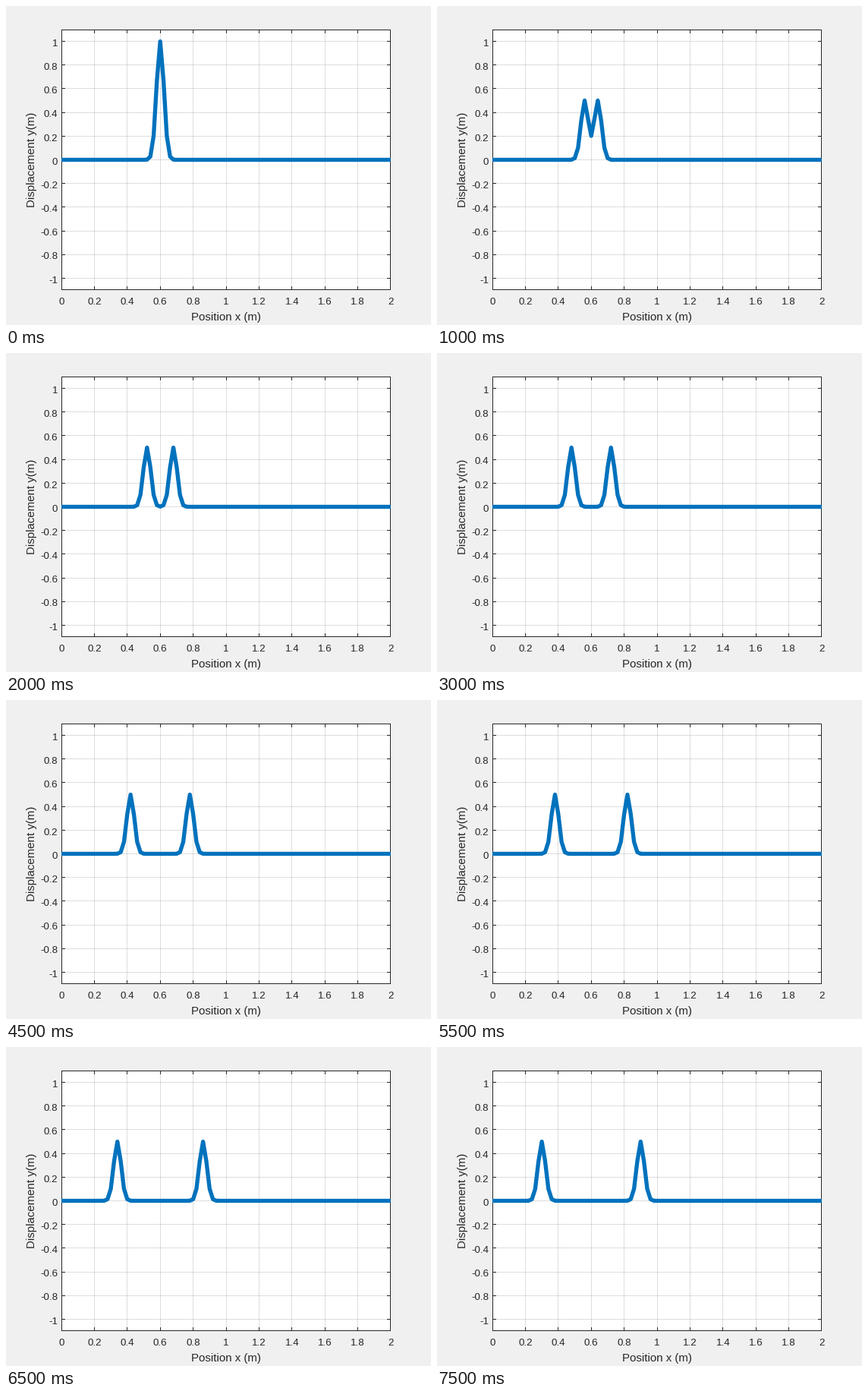
A matplotlib script for the animation above (8 s loop, 560 by 420 pixels).

```python
import math

import numpy as np
import matplotlib.pyplot as plt
from matplotlib.animation import FuncAnimation
from matplotlib.patches import Rectangle

W, H, DPI = 560, 420, 100
PX = 72 / DPI  # points per pixel
LEFT, TOP, RIGHT, BOTTOM = 73, 31, 507, 374
TICK = 5
INK = "#262626"
FRAMES, INTERVAL = 16, 500

plt.rcParams["font.family"] = "Liberation Sans"

# One axes over the whole figure, in pixels measured from the top left.
fig = plt.figure(figsize=(W / DPI, H / DPI), dpi=DPI, facecolor="#f0f0f0")
ax = fig.add_axes([0, 0, 1, 1], xlim=(0, W), ylim=(H, 0))
ax.axis("off")


def px(x):
    return LEFT + (RIGHT - LEFT) * x / 2


def py(y):
    return TOP + (BOTTOM - TOP) * (1.1 - y) / 2.2


def box(x, y, w, h, color=INK, alpha=1):
    ax.add_patch(Rectangle((x, y), w, h, facecolor=color, alpha=alpha,
                           linewidth=0, antialiased=False))


def label(x, y, text, size=13.33, **kw):
    kw = {"ha": "center", "va": "baseline", **kw}
    ax.text(x, y, text, fontsize=size * PX, color=INK, **kw)


width, height = RIGHT - LEFT, BOTTOM - TOP
box(LEFT, TOP, width, height, "white")

xticks = np.arange(11) / 5
yticks = np.arange(-5, 6) / 5
for v in xticks[1:-1]:
    x = math.floor(px(v))
    box(x, TOP, 1, height, alpha=0.15)
    box(x, TOP, 1, TICK)
    box(x, BOTTOM - TICK, 1, TICK)
for v in yticks:
    y = math.floor(py(v))
    box(LEFT, y, width, 1, alpha=0.15)
    box(LEFT, y, TICK, 1)
    box(RIGHT - TICK, y, TICK, 1)

for y in (TOP, BOTTOM - 1):
    box(LEFT, y, width, 1)
for x in (LEFT, RIGHT - 1):
    box(x, TOP, 1, height)

for v in xticks:
    label(px(v), 393, f"{v:g}")
for v in yticks:
    label(68, py(v) + 6.2, f"{v:g}", ha="right")
label(290, 414, "Position x (m)", 15)
label(38, 202.5, "Displacement y(m)", 15, rotation=90,
      rotation_mode="anchor")

xs = np.linspace(0, 2, 101)
line, = ax.plot([], [], color="#0072bd", linewidth=5.33 * PX, zorder=3,
                solid_joinstyle="round", solid_capstyle="butt", snap=False)


def pulse(center):
    return 0.5 * np.exp(-1000 * (xs - center) ** 2)


def update(i):
    shift = 0.02 * i
    line.set_data(px(xs), py(pulse(0.6 - shift) + pulse(0.6 + shift)))
    return line,


anim = FuncAnimation(fig, update, frames=FRAMES, interval=INTERVAL,
                     repeat=True, repeat_delay=0)
plt.show()
```
